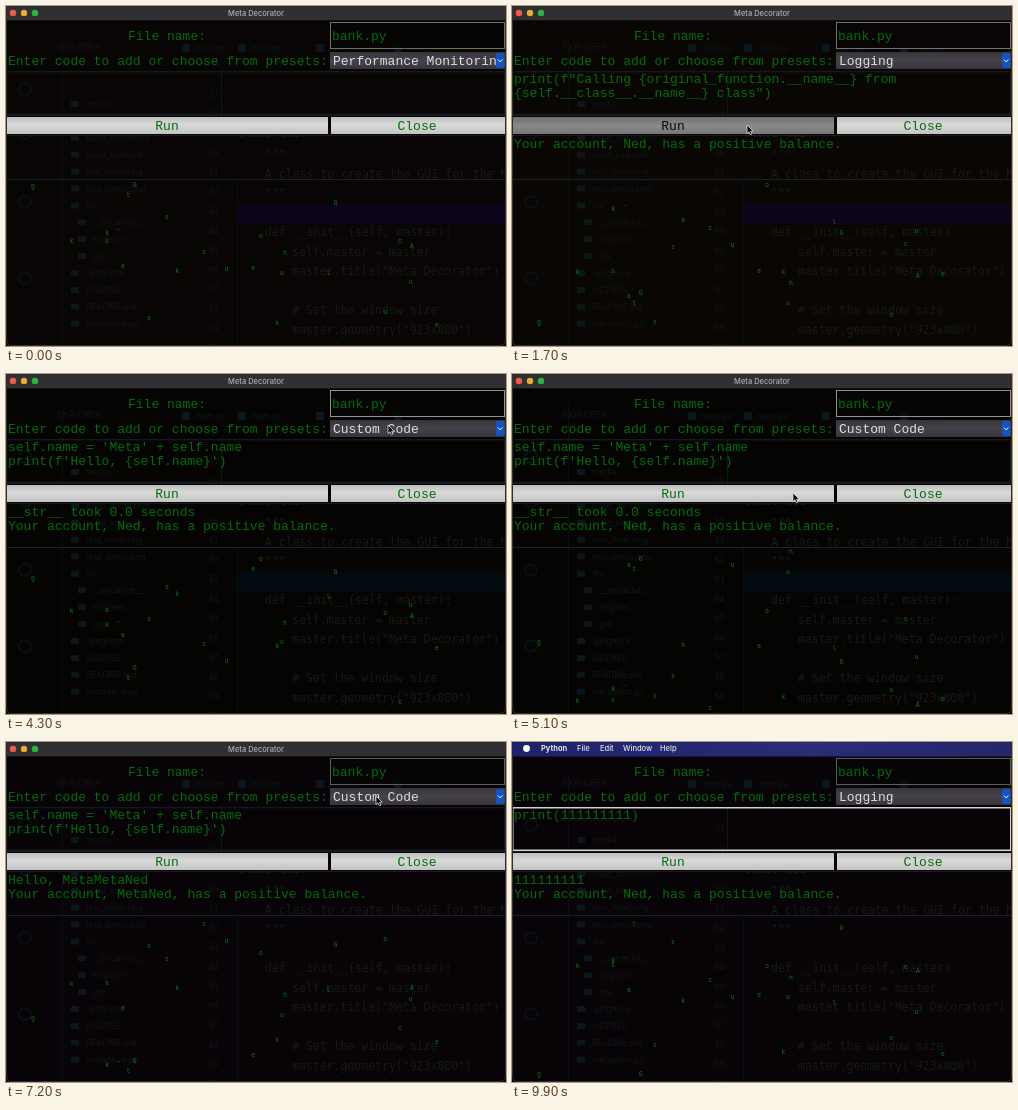
An HTML page for the animation above (10000 ms loop, 500x340 px).

```html
<!DOCTYPE html>
<html lang="en">
<head>
<meta charset="utf-8">
<title>Decorator window</title>
<style>
  html, body { margin: 0; width: 100%; height: 100%; overflow: hidden; background: #000; }
  svg { display: block; width: 500px; height: 340px; }
  text { white-space: pre; }
  .ui { font: 13px "Liberation Mono", "Courier New", monospace; fill: #046c0c; }
  .code { font: 11.5px "DejaVu Sans Mono", monospace; fill: #151a1b; }
  .num { font: 8px "DejaVu Sans Mono", monospace; fill: #0d1718; }
  .file { font: 8.5px Inter, sans-serif; fill: #0e1718; }
  .bar { font: 500 7.5px Inter, sans-serif; fill: #aeadb0; }
  .menu { font: 500 7.5px Inter, sans-serif; fill: #e4e4ee; }
  .rain { font: 6.5px "Liberation Mono", monospace; fill: #067c12; }
</style>
</head>
<body>
<svg viewBox="0 0 500 340">
  <defs>
    <linearGradient id="metal" x2="0" y2="1">
      <stop offset="0" stop-color="#bebebf"/><stop offset=".45" stop-color="#d9d9da"/><stop offset="1" stop-color="#c3c3c4"/>
    </linearGradient>
    <linearGradient id="pressed" x2="0" y2="1">
      <stop offset="0" stop-color="#6e6e6f"/><stop offset=".5" stop-color="#8a8a8b"/><stop offset="1" stop-color="#777778"/>
    </linearGradient>
    <linearGradient id="menuFill" x2="1" y2="0">
      <stop offset="0" stop-color="#1f2168"/><stop offset=".6" stop-color="#2b2c78"/><stop offset="1" stop-color="#25266a"/>
    </linearGradient>
    <linearGradient id="combo" x2="0" y2="1">
      <stop offset="0" stop-color="#37353b"/><stop offset=".5" stop-color="#454349"/><stop offset="1" stop-color="#37353b"/>
    </linearGradient>
  </defs>

  <rect id="back" width="500" height="340"/>
  <rect id="row" x="232" y="198" width="267" height="20"/>
  <g id="editor"></g>

  <g id="rain" class="rain" text-anchor="middle"></g>

  <path d="M0 173.5H500" stroke="#15242f"/>
  <rect id="entry" x="324.5" y="16.5" width="174" height="26" fill="#070504" fill-opacity=".75"/>
  <rect x="324" y="46" width="175" height="17" fill="url(#combo)"/>
  <rect id="area" x=".75" y="65.75" width="498" height="42.5" fill="none"/>
  <rect id="run" x="1" y="111" width="321" height="17"/>
  <rect x="325" y="111" width="174" height="17" fill="url(#metal)"/>
  <path d="M0 109.5H500M0 129.5H500" stroke="#191d20"/>

  <g class="ui">
    <text x="122" y="34">File name:</text>
    <text x="2" y="59">Enter code to add or choose from presets:</text>
    <text x="326" y="34">bank.py</text>
    <text id="preset" x="327" y="59" style="fill:#dededf"></text>
    <text id="code1" x="2" y="77"></text>
    <text id="code2" x="2" y="91"></text>
    <text id="out1" x="2" y="142"></text>
    <text id="out2" x="2" y="156"></text>
    <text id="runText" x="161" y="124" text-anchor="middle">Run</text>
    <text x="411" y="124" text-anchor="middle">Close</text>
  </g>
  <rect x="490" y="47" width="8.5" height="15" rx="2" fill="#1355c0"/>
  <path d="M492 53.5l2.2 2.4 2.2-2.4" fill="none" stroke="#fff"/>
  <path id="caret" d="M0 67V80" stroke="#07700f"/>

  <g id="titleBar">
    <rect width="500" height="14.5" fill="#302f31"/>
    <path d="M0 14.5H500" stroke="#101012"/>
    <circle cx="7" cy="7" r="3.2" fill="#ec5a52"/>
    <circle cx="18" cy="7" r="3.2" fill="#e6ad32"/>
    <circle cx="29" cy="7" r="3.2" fill="#2bb640"/>
    <text class="bar" x="250" y="10" text-anchor="middle">Meta Decorator</text>
  </g>
  <g id="menuBar" class="menu">
    <rect width="500" height="14.5" fill="url(#menuFill)"/>
    <circle cx="14.5" cy="6.5" r="3.4" fill="#fff"/>
    <text x="29" y="9" style="font-weight:700">Python</text>
    <text x="65" y="9">File</text>
    <text x="88" y="9">Edit</text>
    <text x="111" y="9">Window</text>
    <text x="148" y="9">Help</text>
  </g>
  <path d="M.5 14V334Q.5 339.5 6 339.5H494Q499.5 339.5 499.5 334V14" fill="none" stroke="#2d2e30"/>

  <g id="cursor">
    <path id="arrow" d="M0 0V8.6L2 6.8L3.4 9.8L4.9 9.1L3.6 6.2H6.2Z" fill="#000" stroke="#ddd" stroke-width=".8"/>
    <path id="beam" d="M-2.5-4.5Q0-4.5 0-3V3Q0 4.5-2.5 4.5M2.5-4.5Q0-4.5 0-3V3Q0 4.5 2.5 4.5" fill="none" stroke="#b5b5b5"/>
  </g>
</svg>

<script>
const LOOP = 10000, STEP = 100, CHAR = 7.8;
const $ = id => document.getElementById(id);

function add(parent, tag, attrs, label) {
  const el = document.createElementNS("http://www.w3.org/2000/svg", tag);
  for (const key in attrs) el.setAttribute(key, attrs[key]);
  if (label) el.textContent = label;
  parent.append(el);
  return el;
}

function randomFrom(seed) {
  return () => {
    seed = (seed * 1664525 + 1013904223) % 4294967296;
    return seed / 4294967296;
  };
}

// Faint editor behind the window
const editor = $("editor");
[
  [232, 131, "class GUI:"],
  [259, 153, '"""'],
  [259, 172, "A class to create the GUI for the M"],
  [259, 191, '"""'],
  [259, 230, "def __init__(self, master):"],
  [286, 250, "self.master = master"],
  [286, 269, 'master.title("Meta Decorator")'],
  [286, 308, "# Set the window size"],
  [286, 328, 'master.geometry("923x800")']
].forEach(([x, y, s]) => add(editor, "text", { x, y, class: "code" }, s));

for (let i = 0; i < 14; i++)
  add(editor, "text", { x: 203, y: 91 + i * 19.5, class: "num" }, String(57 + i));

add(editor, "text", { x: 51, y: 44, class: "file" }, "EXPLORER");
["media", "background.png", "build_document", "build_example", "test_detecting", "test_demo.png", "src",
 "__pycache__", "engines", "gui", ".gitignore", "LICENSE", "README.md", "metadeco.py"]
  .forEach((s, i) => {
    const y = 101 + i * 16.9, x = i > 6 && i < 10 ? 87 : 80;
    add(editor, "text", { x, y, class: "file" }, s);
    add(editor, "rect", { x: x - 15, y: y - 6, width: 8, height: 6, rx: 1, fill: "#0b1718" });
  });

[83, 127, 196, 272].forEach(cy =>
  add(editor, "circle", { cx: 19, cy, r: 6, fill: "none", stroke: "#08141a", "stroke-width": 1.5 }));
[180, 236, 314, 392].forEach(x => {
  add(editor, "rect", { x: x - 4, y: 38, width: 8, height: 8, rx: 2, fill: "#0a191f" });
  add(editor, "text", { x: x + 9, y: 45, class: "file" }, "main.py");
});
add(editor, "path", { d: "M231.5 174V338M56.5 30V338", stroke: "#070f12" });
add(editor, "path", { d: "M215.5 66V122", stroke: "#081a15" });

// Falling letters
const rnd = randomFrom(41), letters = "selfmetaArigincGotk_hu";
const drops = Array.from({ length: 25 }, () => {
  const ch = letters[Math.floor(rnd() * letters.length)];
  return {
    x: 12 + rnd() * 420, y: rnd() * 160, turns: 4 + Math.floor(rnd() * 4),
    el: add($("rain"), "text", {}, ch)
  };
});

// [start time, value...]
const logCode = ['print(f"Calling {original_function.__name__} from', '{self.__class__.__name__} class")'];
const nameCode = ["self.name = 'Meta' + self.name", "print(f'Hello, {self.name}')"];
const balance = name => `Your account, ${name}, has a positive balance.`;

const presets = [[0, "Performance Monitoring"], [1300, "Logging"], [3300, "Performance Monitoring"],
  [4200, "Custom Code"], [7300, "Logging"]];
const codes = [[0, "", ""], [1300, ...logCode], [3300, "", ""], [4200, ...nameCode],
  [7300, ...logCode], [7700, "", ""]];
const outputs = [
  [0, "", ""],
  [800, balance("Ned"), ""],
  [1900, "Calling __str__ from BamkAccount class", balance("Ned")],
  [3800, "__str__ took 0.0 seconds", balance("Ned")],
  [5300, "Ned account: 100 dollars", balance("Ned")],
  [6300, "Hello, MetaMetaNed", balance("MetaNed")],
  [9400, "111111111", balance("Ned")]
];
const presses = [600, 1700, 3700, 5200, 6200, 9300];

// [start time, window, editor row, entry border]
const looks = [
  [0, "#090504", "#0b041a", "#70705c"],
  [1000, "#0a0604", "#0b041a", "#707070"],
  [2300, "#060403", "#020a0f", "#929292"],
  [6700, "#070306", "#070306", "#5c5c5c"]
];

// [time, x, y]
const path = [
  [300, 300, 75], [600, 235, 119], [800, 235, 119], [1200, 360, 56], [1300, 360, 56], [1600, 235, 119],
  [2000, 235, 119], [2800, 359, 58], [3300, 359, 58], [3600, 240, 119], [3900, 240, 119], [4200, 382, 51],
  [4400, 382, 51], [5100, 281, 119], [6500, 281, 119], [7000, 370, 54], [7300, 370, 54],
  [7600, 357, 84], [8800, 357, 84], [9200, 240, 119], [9400, 240, 119], [9700, 90, 5]
];

const typed = "print(111111111)", typeStart = 7800, typeEnd = 8600;

const at = (table, t) => table.filter(row => row[0] <= t).pop();
const show = (id, on) => $(id).style.display = on ? "" : "none";
const set = (id, key, value) => $(id).setAttribute(key, value);

function cursorAt(t) {
  const i = path.findIndex(p => p[0] > t);
  if (i < 1) return null;
  const [a, b] = [path[i - 1], path[i]], k = (t - a[0]) / (b[0] - a[0]);
  return [a[1] + (b[1] - a[1]) * k, a[2] + (b[2] - a[2]) * k];
}

function typedAt(t) {
  if (t < typeStart) return "";
  if (t >= 8800) return typed;
  const k = Math.min(1, (t - typeStart) / (typeEnd - typeStart));
  return typed.slice(0, Math.round(k * (typed.length - 1)));
}

function draw(t) {
  const [, back, row, border] = at(looks, t);
  set("back", "fill", back);
  set("row", "fill", row);
  set("entry", "stroke", border);

  const editing = t >= 7600, text = typedAt(t);
  const [, line1, line2] = at(codes, t), [, out1, out2] = at(outputs, t);
  $("preset").textContent = at(presets, t)[1];
  $("code1").textContent = text || line1;
  $("code2").textContent = line2;
  $("out1").textContent = out1;
  $("out2").textContent = out2;

  set("area", "stroke", editing ? "#d2d2d2" : "#16222b");
  set("area", "stroke-width", editing ? 1.5 : 1);
  show("caret", t >= 7700 && t < 8900);
  set("caret", "transform", `translate(${2.5 + text.length * CHAR} 0)`);

  const down = presses.some(p => t >= p && t < p + 100);
  set("run", "fill", down ? "url(#pressed)" : "url(#metal)");
  $("runText").style.fill = down ? "#080808" : "";

  const pos = cursorAt(t);
  show("cursor", pos);
  if (pos) {
    const overText = pos[1] > 67 && pos[1] < 107 || pos[1] > 57 && pos[1] < 63;
    set("cursor", "transform", `translate(${pos[0]} ${pos[1]})`);
    show("beam", overText);
    show("arrow", !overText);
  }

  show("titleBar", t < 9700);
  show("menuBar", t >= 9700);

  for (const d of drops) {
    d.el.setAttribute("x", d.x);
    d.el.setAttribute("y", 178 + (d.y + t / LOOP * d.turns * 160) % 160);
  }
}

const start = performance.now();
function tick() {
  const t = (performance.now() - start) % LOOP;
  draw(Math.floor(t / STEP) * STEP);
  requestAnimationFrame(tick);
}
tick();
</script>
</body>
</html>
```
